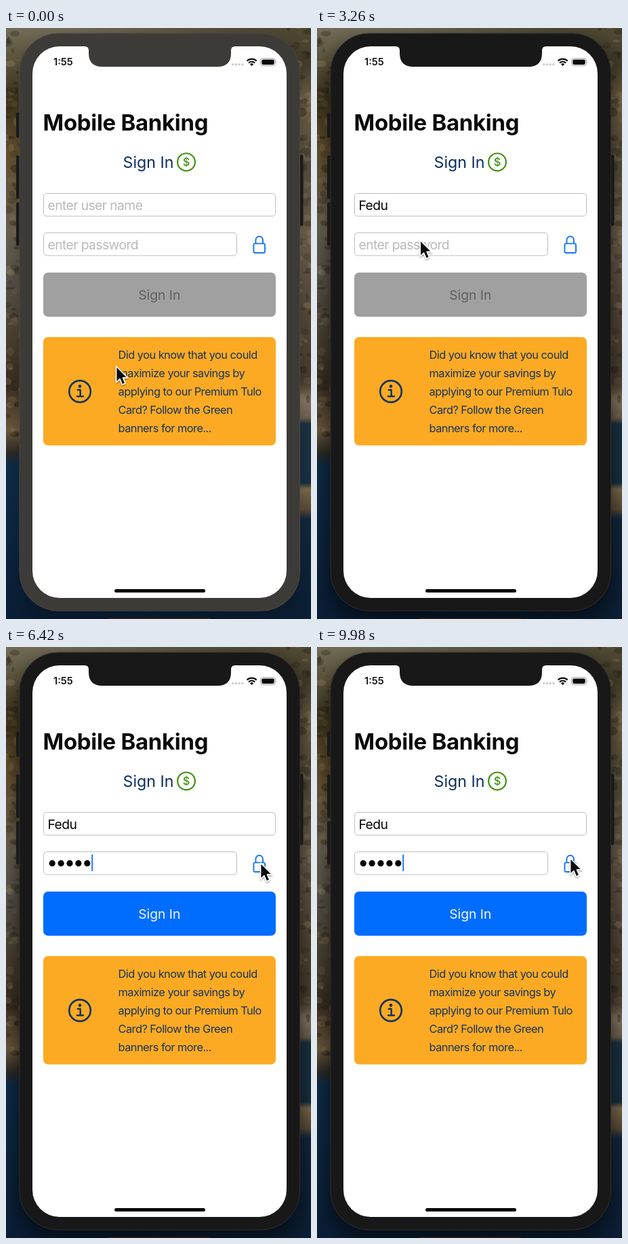
These frames come from a looping animation (450 px wide and 870 px high, 10 s). An HTML page:

```html
<!DOCTYPE html>
<html lang="en">
<head>
<meta charset="utf-8">
<title>Mobile Banking sign in</title>
<style>
  html, body { margin: 0; width: 100%; height: 100%; overflow: hidden; background: #14130f; }
  svg { display: block; }
  text { font-family: Inter, "Liberation Sans", sans-serif; font-optical-sizing: none; white-space: pre; }
  .title { font-size: 32.9px; font-weight: 700; letter-spacing: -.008em; fill: #0b0b0d; }
  .head { font-size: 23.2px; fill: #0c2f5e; }
  .input { font-size: 19.3px; letter-spacing: -.03em; fill: #050505; }
  .hint { fill: #b9b9bb; }
  .action { font-size: 19.3px; text-anchor: middle; }
  .tip { font-size: 16.4px; letter-spacing: -.033em; fill: #17345b; }
  .plain { font-size: 12.6px; text-anchor: middle; fill: #88888a; }
  .clock { font-size: 14.6px; font-weight: 600; fill: #111; }
  .box { fill: #fff; stroke: #bebebe; }
  .line { fill: none; stroke-linecap: round; stroke-linejoin: round; }
</style>
</head>
<body>
<svg width="450" height="870" viewBox="0 0 450 870">
  <defs>
    <linearGradient id="left" x2="0" y2="1">
      <stop offset="0" stop-color="#716b58"/>
      <stop offset=".05" stop-color="#5f5840"/>
      <stop offset=".12" stop-color="#41371f"/>
      <stop offset=".21" stop-color="#66512f"/>
      <stop offset=".34" stop-color="#6b6250"/>
      <stop offset=".42" stop-color="#5a554b"/>
      <stop offset=".52" stop-color="#4d4332"/>
      <stop offset=".6" stop-color="#3b3022"/>
      <stop offset=".68" stop-color="#6f5b3f"/>
      <stop offset=".72" stop-color="#2c2b27"/>
      <stop offset=".74" stop-color="#0f2d49"/>
      <stop offset="1" stop-color="#0a1e36"/>
    </linearGradient>
    <linearGradient id="right" x2="0" y2="1">
      <stop offset="0" stop-color="#4f4935"/>
      <stop offset=".06" stop-color="#433d29"/>
      <stop offset=".12" stop-color="#75644a"/>
      <stop offset=".23" stop-color="#564e3c"/>
      <stop offset=".35" stop-color="#70614e"/>
      <stop offset=".48" stop-color="#574a3a"/>
      <stop offset=".6" stop-color="#4a3e2e"/>
      <stop offset=".63" stop-color="#8b7b66"/>
      <stop offset=".66" stop-color="#6f6250"/>
      <stop offset=".67" stop-color="#1c3444"/>
      <stop offset=".77" stop-color="#1a3142"/>
      <stop offset=".78" stop-color="#7f6c4e"/>
      <stop offset=".815" stop-color="#5c4d38"/>
      <stop offset=".83" stop-color="#14293f"/>
      <stop offset="1" stop-color="#0b1f35"/>
    </linearGradient>
    <linearGradient id="blend">
      <stop offset=".2" stop-color="#fff"/>
      <stop offset=".8" stop-color="#000"/>
    </linearGradient>
    <mask id="fade"><rect width="450" height="870" fill="url(#blend)"/></mask>
    <filter id="soft" x="-20%" y="-20%" width="140%" height="140%"><feGaussianBlur stdDeviation="14"/></filter>
    <filter id="drop" x="-60%" y="-40%" width="220%" height="200%">
      <feDropShadow dx="0" dy="1.5" stdDeviation="1.3" flood-opacity=".4"/>
    </filter>
    <g id="info" stroke="#17345b">
      <circle r="15.8" fill="none" stroke-width="2.7"/>
      <circle cy="-7.6" r="2.3" fill="#17345b" stroke="none"/>
      <path class="line" d="M-3.2 -2.2H.7V7M-4 7.2H5" stroke-width="2.5"/>
    </g>
  </defs>

  <g id="scene">
    <rect width="450" height="870" fill="url(#right)"/>
    <rect width="450" height="870" fill="url(#left)" mask="url(#fade)"/>
    <g id="rocks"></g>
    <path d="M151 869.3H301" stroke="#4a2614" stroke-width="1.4"/>
  </g>
  <rect id="shadow" x="14" y="18" width="426" height="858" rx="62" filter="url(#soft)"/>

  <!-- device -->
  <path d="M17.5 127v32M17.5 190v59M17.5 259v59M436 189v100" stroke="#1b1a19" stroke-width="5" stroke-linecap="round"/>
  <rect id="bezel" x="20" y="8" width="413.5" height="850" rx="57" stroke-width="1"/>
  <rect x="39" y="27" width="375" height="812" rx="40" fill="#fff"/>
  <path id="notch" d="M116 26.5V27q6 0 6 6v4q0 20 20 20H312q20 0 20-20V33q0-6 6-6v-.5z"/>
  <rect x="160" y="826" width="134" height="5" rx="2.5" fill="#050505"/>

  <!-- status bar -->
  <text class="clock" x="70" y="55.3">1:55</text>
  <path d="M334.7 53.6h0M339.4 53.6h0M344.1 53.6h0M348.8 53.6h0" stroke="#c9c9cb" stroke-width="3.4" stroke-linecap="round"/>
  <g fill="none" stroke="#0c0c0c" stroke-width="2.1">
    <path d="M355.5 48.6a10 10 0 0 1 14.2 0M358 51.4a6.4 6.4 0 0 1 9.2 0"/>
    <path d="M360 53.2a3.8 3.8 0 0 1 5.2 0L362.6 56z" fill="#0c0c0c" stroke="none"/>
  </g>
  <rect x="375.6" y="44.8" width="21.8" height="10.8" rx="3.2" fill="none" stroke="#9b9b9b"/>
  <rect x="377.3" y="46.5" width="18.4" height="7.4" rx="1.8" fill="#0a0a0a"/>
  <path d="M398.8 48.4q1.6 1.8 0 3.6z" fill="#9b9b9b"/>

  <!-- form -->
  <text class="title" x="54.5" y="151">Mobile Banking</text>
  <text class="head" x="172.5" y="206">Sign In</text>
  <circle cx="266" cy="197.4" r="12.9" fill="none" stroke="#3f930c" stroke-width="2.2"/>
  <text x="266" y="203.3" text-anchor="middle" font-size="16.5" font-weight="500" fill="#3f930c">$</text>

  <rect class="box" x="55.5" y="243.5" width="342" height="33.5" rx="4.5"/>
  <text id="user" class="input" x="61.5" y="267.5"></text>
  <rect class="box" x="55.5" y="301.5" width="285" height="33.5" rx="4.5"/>
  <text id="passHint" class="input hint" x="61.5" y="325.5">enter password</text>
  <g id="dots" fill="#050505"></g>
  <rect id="caret" width="2" height="24.5" rx=".8" fill="#1c78ee"/>

  <g id="lock" class="line" stroke="#1676ee" stroke-width="1.9">
    <rect x="365.4" y="317.4" width="16.6" height="13.6" rx="2"/>
    <path d="M368.4 317V312.5a5.3 5.8 0 0 1 10.6 0V317"/>
  </g>

  <text id="plain" class="plain" x="226.5" y="371">velmi</text>
  <g id="button">
    <rect id="face" x="55" y="360" width="343" height="65" rx="7"/>
    <text id="label" class="action" x="226.3" y="400">Sign In</text>
  </g>
  <g id="tipLocked">
    <rect x="55" y="455" width="343" height="159.5" rx="7" fill="#fcaa23"/>
    <use href="#info" x="109" y="535"/>
  </g>
  <g id="tipOpen">
    <rect x="55" y="469" width="343" height="132.5" rx="7" fill="#fcaa23"/>
    <use href="#info" x="96" y="535.3"/>
  </g>

  <g id="cursor" filter="url(#drop)">
    <path d="M.6 0V23.6L5.9 18.6 9.4 27 14 25.1 10.5 16.9H17.6z" fill="#080808" stroke="#fff" stroke-width="1.6" stroke-linejoin="round"/>
  </g>
</svg>
<script>
const NS = "http://www.w3.org/2000/svg";
const LOOP = 10000;
const NAME = "Fedu";
const FOCUS_USER = 1150, FOCUS_PASS = 3450, UNLOCK = 7000, RELOCK = 9500;
const nameKeys = [1780, 1960, 2200, 2380];
const passKeys = [4120, 4350, 4600, 4800, 5000];

// time, x, y of the pointer tip
const path = [
  [0, 162, 498], [450, 162, 498], [1050, 165, 258], [2650, 165, 258],
  [3300, 151.5, 313], [5250, 151.5, 313], [6150, 375, 318], [7000, 375, 318],
  [7200, 376, 318], [8200, 376, 318], [8700, 370, 313], [9250, 370, 313],
  [9450, 373, 311], [LOOP, 373, 311]
];

const $ = id => document.getElementById(id);
const set = (el, attrs) => { for (const k in attrs) el.setAttribute(k, attrs[k]); return el; };
const add = (parent, tag, attrs) => parent.appendChild(set(document.createElementNS(NS, tag), attrs));
const show = (id, on) => { $(id).style.display = on ? "" : "none"; };
const typed = (keys, t) => keys.filter(k => k <= t).length;

function addLines(id, x, y, lines) {
  lines.forEach((line, i) => {
    add($(id), "text", { class: "tip", x, y: y + i * 27 }).textContent = line;
  });
}

function addRocks() {
  let seed = 11;
  const rnd = () => (seed = seed * 16807 % 2147483647) / 2147483647;
  for (let i = 0; i < 240; i++) {
    const onLeft = i % 2, y = rnd() * (onLeft ? 625 : 570);
    add($("rocks"), "ellipse", {
      cx: onLeft ? rnd() * 34 : 416 + rnd() * 34, cy: y,
      rx: 2 + rnd() * 6, ry: 1.5 + rnd() * 5,
      fill: rnd() < .55 ? "#1c170d" : "#a08a68", opacity: .12 + rnd() * .25
    });
  }
}

function pointer(t) {
  const i = Math.max(1, path.findIndex(p => p[0] > t));
  const [t0, x0, y0] = path[i - 1], [t1, x1, y1] = path[i];
  const u = (t - t0) / (t1 - t0), e = u * u * (3 - 2 * u);
  return [x0 + (x1 - x0) * e, y0 + (y1 - y0) * e];
}

// blink restarts at the latest focus or key press
function caretAlpha(t) {
  const last = Math.max(...[FOCUS_USER, FOCUS_PASS, ...nameKeys, ...passKeys].filter(k => k <= t));
  const p = (t - last) % 1000 / 1000;
  if (p < .6) return 1;
  if (p < .68) return (.68 - p) / .08;
  return p < .88 ? 0 : Math.min(1, (p - .88) / .08);
}

function draw(now) {
  const t = now % LOOP;
  const active = t >= FOCUS_USER, inPass = t >= FOCUS_PASS;
  const open = t >= UNLOCK && t < RELOCK;
  const letters = typed(nameKeys, t), count = typed(passKeys, t);
  const ready = letters > 0 && count > 0;

  set($("bezel"), { fill: active ? "#181818" : "#3d3b38", stroke: active ? "#302e2b" : "#4b4843" });
  set($("notch"), { fill: active ? "#181818" : "#3d3b38" });
  set($("shadow"), { opacity: active ? .5 : .2 });

  const user = $("user");
  user.textContent = letters ? NAME.slice(0, letters) : "enter user name";
  user.classList.toggle("hint", !letters);
  show("passHint", !count);
  [...$("dots").children].forEach((dot, i) => { dot.style.display = i < count ? "" : "none"; });

  const x = inPass ? 62.2 + 12.9 * count - (count ? 0 : .5)
    : 61.8 + (letters ? user.getComputedTextLength() : 0);
  set($("caret"), { x: x - .5, y: inPass ? 305.5 : 248, opacity: active ? caretAlpha(t) : 0 });

  set($("face"), { fill: ready ? "#006dff" : "#a0a0a0" });
  set($("label"), { fill: ready ? "#f5f9ff" : "#5f5f5f" });
  set($("button"), { transform: `translate(0 ${open ? 14 : 0})` });
  set($("lock"), { transform: `rotate(${open ? 180 : 0} 373.7 318.6)` });
  show("plain", open);
  show("tipOpen", open);
  show("tipLocked", !open);

  set($("cursor"), { transform: `translate(${pointer(t)})` });
  requestAnimationFrame(draw);
}

addRocks();
passKeys.forEach((_, i) => add($("dots"), "circle", { cx: 68.2 + 12.9 * i, cy: 318.4, r: 4.6 }));
addLines("tipLocked", 165.5, 486.6, [
  "Did you know that you could", "maximize your savings by",
  "applying to our Premium Tulo", "Card? Follow the Green", "banners for more..."
]);
addLines("tipOpen", 152.5, 500.6, [
  "Remember if you tap the lock", "button, keep you Nolbek screen",
  "away from view of the creepy", "others!"
]);
draw(performance.now());
</script>
</body>
</html>
```
